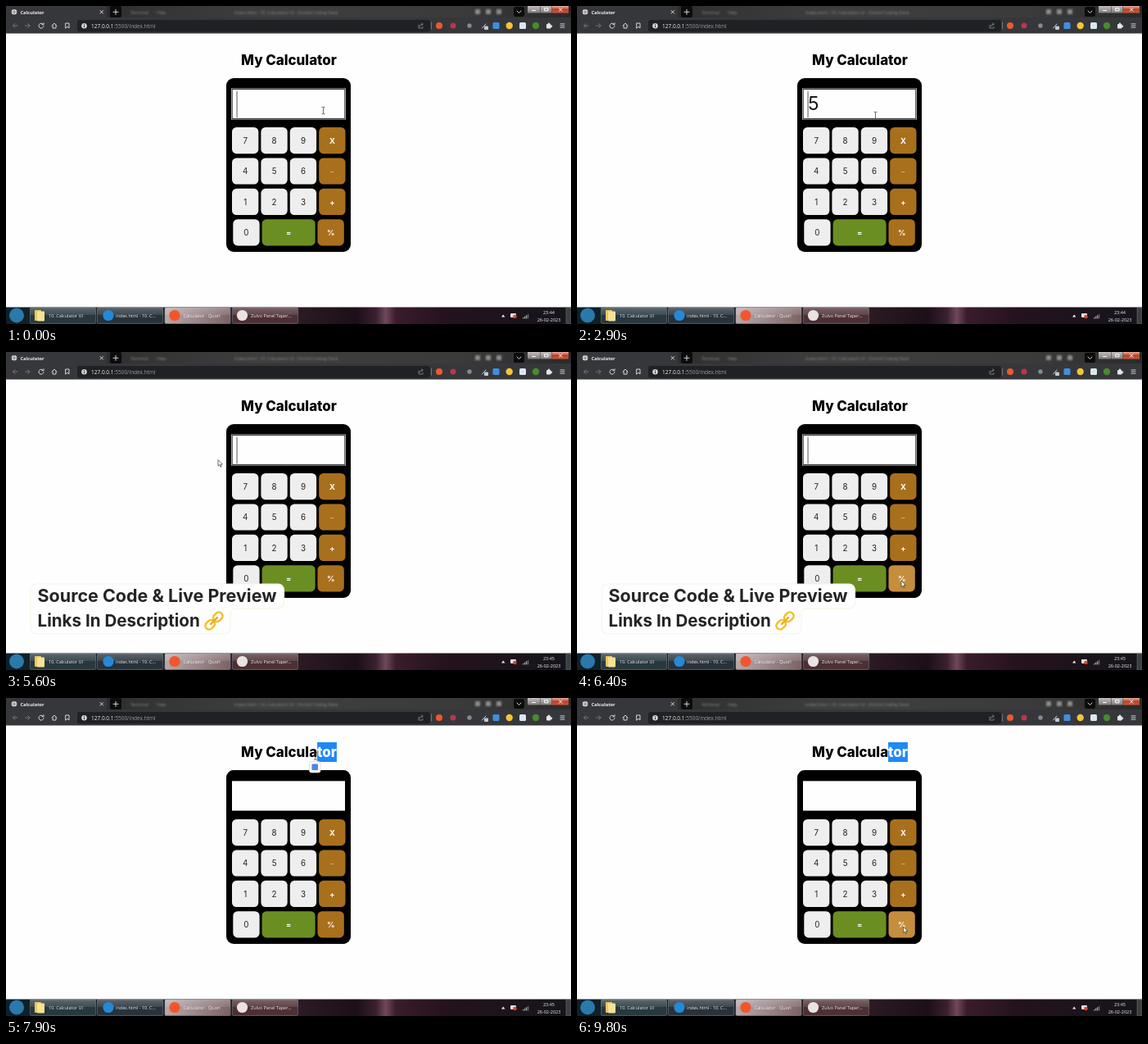
Animation, 690 px wide and 388 px high, one loop 10 s. Source, as an HTML page:

```html
<!DOCTYPE html>
<html lang="en">
<head>
<meta charset="utf-8">
<title>Calculator</title>
<style>
  html, body { margin: 0; width: 100%; height: 100%; overflow: hidden; background: #fefefe; }
  svg { display: block; width: 100vw; height: 100vh; }
  text { white-space: pre; }
  .ui { font: 5.5px "Open Sans", "Noto Sans", sans-serif; fill: #f2f2f2; }
  .tab { font-size: 5.7px; font-weight: 700; }
  .url { font-size: 6.5px; }
  .glass { filter: blur(.8px); fill: #8c8c8c; font-size: 5.4px; }
  .geo { font-family: Inter, "Open Sans", sans-serif; }
  .title { font-size: 16.9px; font-weight: 800; }
  .value { font-size: 22.8px; fill: #111; }
  .key { font-size: 9.8px; text-anchor: middle; fill: #222; }
  .op { font-size: 9.4px; font-weight: 700; fill: #fff; }
  .thin { font-weight: 300; fill: #e8d8c0; }
  .note { font-size: 20.6px; font-weight: 700; fill: #242424; }
  .wide { font-size: 21.5px; }
  .line { fill: none; stroke: #d4d5d8; stroke-width: 1; stroke-linecap: round; stroke-linejoin: round; }
  .dim { stroke: #74767a; }
  .picked { fill: #fff; }
</style>
</head>
<body>
<svg viewBox="0 0 690 388" preserveAspectRatio="none">
  <defs>
    <linearGradient id="strip">
      <stop offset="0" stop-color="#1c1c1d"/><stop offset=".24" stop-color="#333"/>
      <stop offset=".45" stop-color="#3e3e3e"/><stop offset=".8" stop-color="#3b3b3b"/>
      <stop offset="1" stop-color="#2a2a2b"/>
    </linearGradient>
    <linearGradient id="bar">
      <stop offset="0" stop-color="#0e2029"/><stop offset=".3" stop-color="#1d2227"/>
      <stop offset=".52" stop-color="#2c1a24"/><stop offset=".62" stop-color="#1c0f18"/>
      <stop offset=".655" stop-color="#3a2030"/><stop offset=".672" stop-color="#70485a"/>
      <stop offset=".69" stop-color="#3a1c2c"/><stop offset=".78" stop-color="#24121e"/>
      <stop offset="1" stop-color="#15151a"/>
    </linearGradient>
    <linearGradient id="shine" x2="0" y2="1">
      <stop offset="0" stop-color="#fff" stop-opacity=".24"/><stop offset=".48" stop-color="#fff" stop-opacity=".1"/>
      <stop offset=".5" stop-color="#fff" stop-opacity="0"/>
    </linearGradient>
    <linearGradient id="active">
      <stop offset="0" stop-color="#b9a9aa"/><stop offset=".5" stop-color="#99868a"/><stop offset="1" stop-color="#7d6264"/>
    </linearGradient>
    <linearGradient id="frame" x2="0" y2="1">
      <stop offset="0" stop-color="#c4bcbc"/><stop offset="1" stop-color="#807a7b"/>
    </linearGradient>
    <linearGradient id="close" x2="0" y2="1">
      <stop offset="0" stop-color="#e6b0a2"/><stop offset=".5" stop-color="#bd3f2a"/><stop offset="1" stop-color="#c95a35"/>
    </linearGradient>
  </defs>

  <rect width="690" height="388" fill="#fefefe"/>
  <g id="browser"></g>
  <g id="taskbar"></g>

  <rect id="titleMark" y="54" height="24" fill="#1f88f7"/>
  <text id="title" class="geo title" x="287" y="71.8"><tspan></tspan><tspan class="picked"></tspan></text>

  <rect x="269" y="88" width="152" height="212" rx="9"/>
  <rect id="field" fill="#fefefe"/>
  <rect id="ring" x="275.4" y="100.9" width="139.2" height="37.2" fill="none" stroke="#c4c4c4" stroke-width=".9"/>
  <rect id="valueMark" y="104" height="32" fill="#1f88f7"/>
  <text id="value" class="geo value" x="282" y="127.3"><tspan></tspan><tspan></tspan></text>
  <rect id="caret" y="104" width=".9" height="32" fill="#444"/>
  <g id="keys"></g>

  <g id="badge">
    <path d="M37 283H332.5a7 7 0 0 1 7 7V306a7 7 0 0 1-7 7H280a6 6 0 0 0-6 6V337a7 7 0 0 1-7 7H37a7 7 0 0 1-7-7V290a7 7 0 0 1 7-7z"
      fill="#fefefe" stroke="#f3f5e3" stroke-width="1.2"/>
    <text class="geo note wide" x="38.5" y="305">Source Code &amp; Live Preview</text>
    <text class="geo note" x="38.5" y="335.3">Links In Description</text>
    <g transform="translate(254 328) rotate(-45)" fill="none" stroke="#f3c02c" stroke-width="2.6">
      <rect x="-13" y="-4.6" width="12.5" height="9.2" rx="4.6"/>
      <rect x=".5" y="-4.6" width="12.5" height="9.2" rx="4.6"/>
      <path d="M-5.5 0H5.5" stroke="#e8ae20" stroke-width="2.4" stroke-linecap="round"/>
    </g>
  </g>

  <g id="popup">
    <rect x="370.5" y="77.5" width="13.5" height="13.5" rx="2.5" fill="#fafafa" stroke="#d9d9d9" stroke-width=".7"/>
    <rect x="373.5" y="80.5" width="7.5" height="7.5" rx="1" fill="#4a86e8"/>
  </g>
  <path id="beam" d="M-2-4.2H-.5L0-3.7L.5-4.2H2M0-3.7V3.7M-2 4.2H-.5L0 3.7L.5 4.2H2" fill="none" stroke="#444" stroke-width=".8"/>
  <path id="arrow" d="M0 0V7.6L1.8 6L3 8.8L4.2 8.3L3 5.6H5.4Z" fill="#fff" stroke="#333" stroke-width=".7"/>
</svg>

<script>
const LOOP = 10000, STEP = 100, BLINK = 560;
const $ = id => document.getElementById(id);
const rect = (x, y, w, h, fill, more = '') => `<rect x="${x}" y="${y}" width="${w}" height="${h}" fill="${fill}" ${more}/>`;
const dot = (x, y, r, fill) => `<circle cx="${x}" cy="${y}" r="${r}" fill="${fill}"/>`;
const line = (d, cls = '', more = '') => `<path class="line ${cls}" d="${d}" ${more}/>`;
const label = (x, y, s, cls = '', more = '') => `<text class="ui ${cls}" x="${x}" y="${y}" ${more}>${s}</text>`;

$('browser').innerHTML =
  rect(0, 0, 690, 15, 'url(#strip)') +
  label(152, 9.5, 'Terminal', 'glass') + label(184, 9.5, 'Help', 'glass') +
  label(279, 9.5, 'index.html - 10. Calculator UI - Orchid Coding Desk', 'glass') +
  [573, 586, 599].map(x => rect(x, 4, 6, 6, '#8c8c8c', 'style="filter:blur(.8px)"')).join('') +
  rect(0, 0, 123, 15, '#36373b') + rect(0, 14, 690, 19.5, '#36373b') +
  dot(10, 7.3, 3.3, '#dadbdd') + line('M7 7.3H13M10 4V10.6', '', 'style="stroke:#555;stroke-width:.6"') +
  label(17.5, 9.5, 'Calculator', 'tab') +
  line('M115 5.5L118.6 9.1M118.6 5.5L115 9.1') +
  rect(127, 0, 14, 14, '#0c0c0d', 'rx="2"') + line('M131 7.3H137M134 4.3V10.3') +
  rect(620, 1, 13, 12, '#0c0c0d', 'rx="2"') + line('M624 6L626.5 8.5L629 6') +
  rect(637, 0, 15, 8.5, 'url(#frame)') + rect(652.5, 0, 14, 8.5, 'url(#frame)') +
  rect(667, 0, 20, 8.5, 'url(#close)') +
  line('M642.5 5.5H646.5M658 2.8H662V5.8H658ZM675.5 2.7L679 6.2M679 2.7L675.5 6.2', '', 'style="stroke:#fff"') +
  rect(87, 17, 431, 14.5, '#202124', 'rx="3"') +
  line('M14 24H8.5M11 21.5L8.5 24L11 26.5', 'dim') +
  line('M23.5 24H29M26.5 21.5L29 24L26.5 26.5', 'dim') +
  line('M45.3 22.2A3 3 0 1 0 46 24.5M46 20.7V22.7H44') +
  line('M56 24L59 21L62 24M57 23.5V27H61V23.5') +
  line('M73 21H77V27L75 25.2L73 27Z') +
  dot(95.5, 24.2, 3.3, '#d0d1d4') + rect(95.1, 23.6, .9, 2.5, '#222') + rect(95.1, 22, .9, .9, '#222') +
  label(104, 26.5, '127.0.0.1<tspan fill="#9a9ca0">:5500/index.html</tspan>', 'url') +
  line('M504 23V27H509V25.5M505 25Q505.5 22.2 509 22.2M507.5 20.7L509.2 22.2L507.5 23.7', 'dim') +
  line('M519.5 20V28', 'dim') +
  dot(529, 24, 4, '#ec5a2b') + dot(546, 24, 3.5, '#b9364d') +
  dot(566, 24, 2.7, '#888a8f') + line('M581.5 27L586 22') + rect(584, 24.5, 5, 4.5, '#c6c9cf', 'rx="1"') +
  rect(594.5, 20, 8, 8, '#3f8fe0', 'rx="1.5"') + dot(614.7, 24, 4.2, '#f4c534') +
  rect(627, 20, 8, 8, '#dbe7f0', 'rx="1.5"') + dot(647, 24, 4.2, '#4a8a2a') +
  rect(660, 22, 5.5, 5.5, '#e4e5e7', 'rx="1"') + dot(663, 21.7, 1.2, '#e4e5e7') + dot(666, 24.7, 1.2, '#e4e5e7') +
  line('M677 21.8H682M677 24H682M677 26.2H682', '', 'style="stroke-width:.9"');

const task = (x, fill, icon, s) =>
  rect(x, 368, 80, 19.4, fill, 'rx="1.5" stroke="#8a9095" stroke-opacity=".65" stroke-width=".7"') +
  rect(x, 368, 80, 19, 'url(#shine)') + icon + label(x + 22.5, 379.8, s);
$('taskbar').innerHTML =
  rect(0, 367.5, 690, 20.5, 'url(#bar)') +
  dot(13, 377.5, 9, '#2b78ab') +
  task(29.5, '#27383f',
    rect(35, 371, 8, 13, '#e9c65c', 'rx="1"') + rect(38, 372.5, 9, 12, '#f6e196', 'rx="1"'), '10. Calculator UI') +
  task(111.5, '#28323b', dot(125, 377.5, 6.6, '#2489d8'), 'index.html - 10. C...') +
  task(194, 'url(#active)', dot(206, 377.5, 6.6, '#f2552c'), 'Calculator - Quorl') +
  task(276.5, '#4d3035', dot(288.5, 377.5, 6.6, '#e9e3e1'), 'Zulvo Panel Taper...') +
  '<path d="M605 379.5L607.2 376.5L609.4 379.5Z" fill="#eee"/>' +
  rect(616, 375, 7, 5, '#e6e0dc', 'rx="1"') + dot(621.5, 379, 2.3, '#d8442c') +
  [0, 1, 2, 3].map(i => rect(631 + i * 2, 380 - i * 1.4, 1.3, 1.4 + i * 1.4, i < 3 ? '#aaa' : '#666')).join('') +
  label(663, 376.2, '', '', 'id="clock" text-anchor="middle"') +
  label(663, 385, '26-02-2023', '', 'text-anchor="middle"') +
  rect(684, 368, 6, 20, '#3a3f44', 'stroke="#777" stroke-width=".5"');

// Keypad
const TONES = { num: ['#eee', '#d0d2d6'], op: ['#a8701d', '#c58d3e'], eq: ['#6b8e23', '#86a83c'] };
const keys = [];
['789X', '456−', '123+'].forEach((row, r) => [...row].forEach((s, c) =>
  keys.push({ s, x: 276 + c * 35.4, y: 148 + r * 37.4, w: 32.3, tone: c < 3 ? 'num' : 'op' })));
keys.push(
  { s: '0', x: 277.3, y: 260.2, w: 32.3, tone: 'num' },
  { s: '=', x: 312.6, y: 260.2, w: 65, tone: 'eq' },
  { s: '%', x: 380.5, y: 260.2, w: 32.3, tone: 'op' });
const keyClass = k => k.tone === 'num' ? '' : k.s === '−' ? 'op thin' : 'op';
$('keys').innerHTML = keys.map(k =>
  rect(k.x, k.y, k.w, 32.2, TONES[k.tone][0], 'rx="5.5"') +
  `<text class="geo key ${keyClass(k)}" x="${k.x + k.w / 2}" y="${k.y + 19.7}">${k.s}</text>`).join('');
const faces = $('keys').querySelectorAll('rect');

// Pointer path: time, x, y
const PATH = [
  [0, 387.5, 127.5], [900, 387.5, 127.5], [1100, 386, 141], [1800, 386, 141], [2200, 364.5, 130],
  [2300, 364.5, 130], [2400, 364.5, 133.5], [2900, 364.5, 133.5], [3200, 370, 137], [4400, 370, 137],
  [4600, 394, 126], [4700, 352, 122], [5200, 252, 130], [5600, 259, 131.5], [5800, 290, 160],
  [6000, 350, 225], [6200, 396, 279], [6600, 396, 279], [6800, 362, 268], [7000, 328, 242],
  [7100, 328, 240], [7200, 328, 152], [7400, 405, 66], [7500, 401, 68], [7700, 378, 71],
  [8100, 378, 71], [8200, 406, 80], [8400, 398, 130], [8600, 300, 180], [8800, 262, 208],
  [9000, 300, 240], [9300, 345, 270], [9600, 398.5, 279], [LOOP, 398.5, 279]];

// Display: time, text, caret index, selection start
const TYPING = [
  [0, '', 0], [800, '5', 1], [1400, '5', 0], [3200, '25', 1], [3400, '255', 2], [3600, '2575', 3],
  [3900, '25735', 4], [4800, '25735', 4, 4], [4900, '25735', 3, 3], [5000, '25735', 2, 2],
  [5100, '25735', 1, 1], [5200, '25735', 0, 0], [5280, '', 0]];

const FOCUS_END = 6700;
const latest = (table, t) => table.filter(row => row[0] <= t).pop();
const clamp = v => Math.max(0, Math.min(1, v));

function pointer(t) {
  const i = Math.max(1, PATH.findIndex(p => p[0] > t));
  const [a, b] = [PATH[i - 1], PATH[i]];
  const k = clamp((t - a[0]) / (b[0] - a[0]));
  return [a[1] + (b[1] - a[1]) * k, a[2] + (b[2] - a[2]) * k];
}

const set = (id, attrs) => Object.entries(attrs).forEach(([k, v]) => $(id).setAttribute(k, v));
const show = (id, on) => $(id).style.display = on ? '' : 'none';

// Splits text at an index, marks the tail, and returns the x of the split.
function split(id, s, from) {
  const [head, tail] = $(id).children;
  head.textContent = s.slice(0, from);
  tail.textContent = s.slice(from);
  const x = +$(id).getAttribute('x') + (from ? head.getComputedTextLength() : 0);
  set(id + 'Mark', { x, width: from < s.length ? tail.getComputedTextLength() : 0 });
  return x;
}

function drawDisplay(t) {
  const [since, s, at, from] = latest(TYPING, t);
  const selecting = from !== undefined, focused = t < FOCUS_END;
  set('field', focused
    ? { x: 276.6, y: 102.1, width: 136.8, height: 34.8 }
    : { x: 276, y: 101.3, width: 138, height: 36.2 });
  show('ring', focused);
  $('value').children[1].classList.toggle('picked', selecting);
  const x = split('value', s, at);
  show('valueMark', selecting);
  show('caret', focused && !selecting && Math.floor((t - since) / BLINK) % 2 === 0);
  set('caret', { x: x - .4 });
}

function drawPointer(t) {
  const [x, y] = pointer(t);
  const inField = x > 276 && x < 414 && y > 100 && y < 139;
  const beam = inField || t < 5300 || (t >= 7400 && t < 8200);
  show('beam', beam);
  show('arrow', !beam);
  set(beam ? 'beam' : 'arrow', { transform: `translate(${x} ${y})` });
  const [hx, hy] = pointer(Math.max(0, t - STEP));
  keys.forEach((k, i) => {
    const over = hx > k.x && hx < k.x + k.w && hy > k.y && hy < k.y + 32.2;
    faces[i].setAttribute('fill', TONES[k.tone][+over]);
  });
}

function drawBadge(t) {
  const enter = clamp((t - 2900) / 400), leave = clamp((t - 7200) / 450);
  show('badge', enter > 0 && leave < 1);
  set('badge', { transform: `translate(${-345 * ((1 - enter) ** 3 + leave ** 3)} 0)` });
}

function render(time) {
  const t = Math.floor(time % LOOP / STEP) * STEP;
  $('clock').textContent = t < 3400 ? '23:44' : '23:45';
  split('title', 'My Calculator', 13 - Math.max(0, Math.min(3, (t - 7400) / STEP)));
  drawDisplay(t);
  drawBadge(t);
  show('popup', t >= 7900 && t < 8400);
  drawPointer(t);
}

const start = performance.now();
(function tick() {
  render(performance.now() - start);
  requestAnimationFrame(tick);
})();
</script>
</body>
</html>
```
